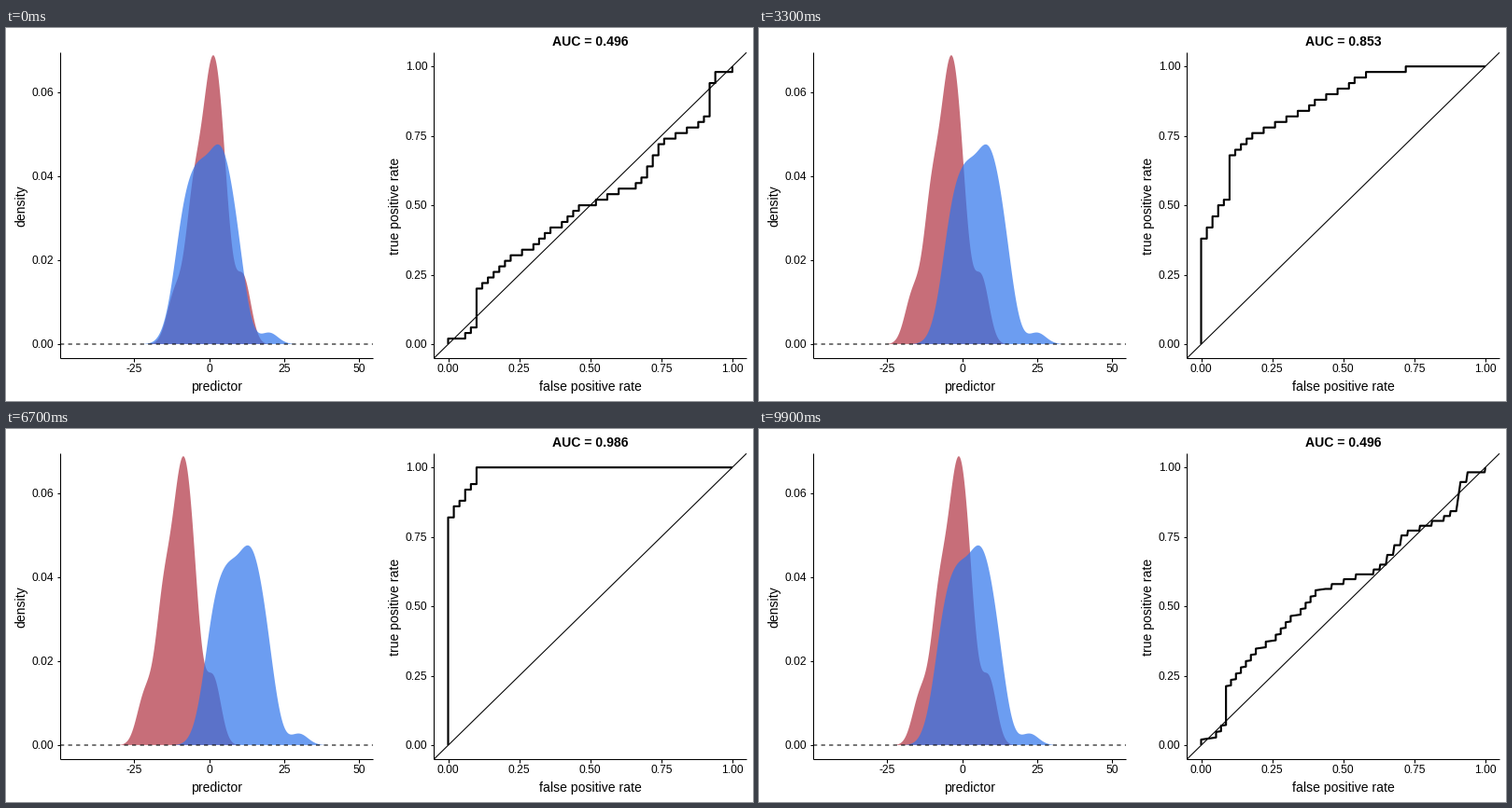
A matplotlib script that plays this animation: 800 px wide and 400 px high, repeating every 10000 ms.

```python
import numpy as np
import matplotlib.pyplot as plt
from matplotlib.animation import FuncAnimation

plt.rcParams["font.family"] = "Liberation Sans"
W, H, DPI = 800, 400, 100
PT = 72 / DPI                     # points per pixel

FRAMES, STEPS = 100, 8
STARTS = [9, 26, 43, 60, 77, 93]  # first frame of each transition
SHIFT = [0, 2.5, 5, 7.5, 10, 20]  # how far each group moves apart
AUC = ["0.496", "0.694", "0.853", "0.950", "0.986", "1.000"]


def pred_x(v):
    return 217.5 + 3.205 * v


def dens_y(v):
    return 339 - 4500 * v


def rate_x(v):
    return 473.5 + 304.4 * v


def rate_y(v):
    return 339 - 297.8 * v


def sample(*keys):
    """Fifty ranked scores, evenly spaced between a few (rank, score) keys."""
    rank, score = zip(*keys)
    return np.interp(np.arange(1, 51), rank, score)


def density(scores, bw):
    """Outline of the Gaussian kernel density of the scores."""
    x = np.linspace(scores.min() - 3.2 * bw, scores.max() + 3.2 * bw, 300)
    z = (x[:, None] - scores) / bw
    return x, np.exp(-z * z / 2).mean(axis=1) / (bw * np.sqrt(2 * np.pi))


def roc_curve(neg, pos):
    """Rates after lowering the threshold past each score in turn."""
    order = np.argsort(-np.concatenate([neg, pos]), kind="stable")
    hit = order >= len(neg)
    fpr = np.append(0, np.cumsum(~hit)) / len(neg)
    tpr = np.append(0, np.cumsum(hit)) / len(pos)
    return np.array([fpr, tpr])


negatives = sample((1, 12.8), (5, 10.1), (6, 6.5), (12, 4), (21, 1.75),
                   (34, -1.7), (38, -4.1), (46, -7), (47, -9.7), (50, -13))
positives = sample((1, 20.1), (2, 11.2), (9, 6.9), (14, 5.2), (18, 3.2), (25, 1.05),
                   (30, -2.1), (37, -4.4), (40, -6.4), (49, -10.5), (50, -13.2))
neg_shape = density(negatives, 2.35)
pos_shape = density(positives, 2.95)
curves = [roc_curve(negatives - s, positives + s) for s in SHIFT]

fig = plt.figure(figsize=(W / DPI, H / DPI), dpi=DPI, facecolor="white")
ax = fig.add_axes([0, 0, 1, 1])
ax.set(xlim=(0, W), ylim=(H, 0))
ax.axis("off")


def line(xs, ys, width=1.07, **kw):
    kw = {"color": "black", "solid_capstyle": "butt", **kw}
    return ax.plot(xs, ys, lw=width * PT, **kw)[0]


def text(x, y, s, size, ha="center", **kw):
    return ax.text(x, y, s, fontsize=size * PT, ha=ha, va="baseline",
                   color="black", rotation_mode="anchor", **kw)


def frame_axes(left, right, xticks, yticks, xname, yname):
    line([left, left], [26, 354])
    line([left, right], [353.6, 353.6])
    for x, label in xticks:
        line([x, x], [354, 357.5])
        text(x, 369.3, label, 12)
    for y, label in yticks:
        line([left - 3.5, left], [y, y])
        text(left - 7, y + 4.2, label, 12, ha="right")
    text((left + right) / 2, 388.6, xname, 14)
    text(left - 37.5, 190.5, yname, 14, rotation=90)


def fill(color):
    patch = plt.Polygon([(0, 0), (1, 0), (0, 1)], fc=color, ec="none", lw=0, alpha=.7)
    return ax.add_patch(patch)


red, blue = fill("#b03141"), fill("#2e74ec")
line([58, 393], [339, 339], dashes=(4, 4), dash_capstyle="butt", snap=False)
line([458.4, 793], [354, 26.3])
roc = line([], [], 2.13, solid_joinstyle="round", snap=False)
title = text(625.7, 19.3, "", 14, weight="bold")

frame_axes(58, 393,
           [(pred_x(v), str(v)) for v in (-25, 0, 25, 50)],
           [(dens_y(v), f"{v:.2f}") for v in (0, .02, .04, .06)],
           "predictor", "density")
quarters = np.linspace(0, 1, 5)
frame_axes(458.4, 793,
           [(rate_x(v), f"{v:.2f}") for v in quarters],
           [(rate_y(v), f"{v:.2f}") for v in quarters],
           "false positive rate", "true positive rate")


def state_at(n):
    """Previous state, next state and the share of the way between them."""
    for i, start in enumerate(STARTS):
        if n < start:
            return i, i, 0
        if n < start + STEPS:
            return i, (i + 1) % len(STARTS), (n - start + 1) / STEPS
    return 0, 0, 0


def place(patch, shape, shift):
    x, d = shape
    patch.set_xy(np.column_stack([pred_x(x + shift), dens_y(d)]))


def draw(n):
    a, b, p = state_at(n)
    shift = (1 - p) * SHIFT[a] + p * SHIFT[b]
    place(red, neg_shape, -shift)
    place(blue, pos_shape, shift)
    fpr, tpr = (1 - p) * curves[a] + p * curves[b]
    roc.set_data(rate_x(fpr), rate_y(tpr))
    title.set_text("AUC = " + AUC[b if p >= .5 else a])
    return red, blue, roc, title


anim = FuncAnimation(fig, draw, frames=FRAMES, init_func=lambda: draw(0),
                     interval=100, repeat=True, repeat_delay=0, blit=False)
plt.show()
```
